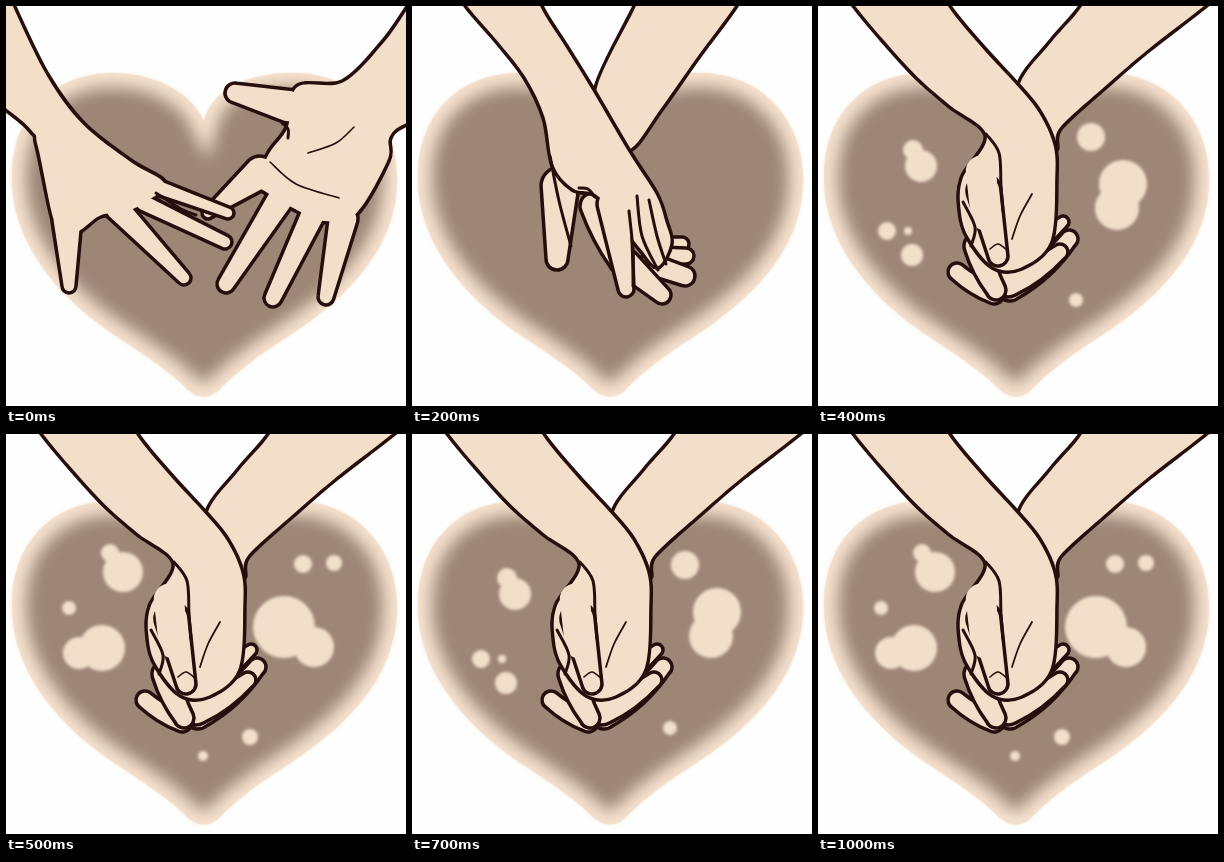
These frames come from a looping animation (400 px wide and 400 px high, 1100 ms). An HTML page:

```html
<!DOCTYPE html>
<html>
<head>
<meta charset="utf-8">
<style>
html, body { margin: 0; width: 100%; height: 100%; overflow: hidden; background: #fefefe; }
svg { display: block; width: 100vw; height: 100vh; }
.ink { fill: none; stroke: #260e0d; stroke-width: 7; stroke-linecap: round; stroke-linejoin: round; }
.skin { fill: #f3dfc9; }
</style>
</head>
<body>
<svg id="stage" viewBox="0 0 400 400">
  <defs>
    <path id="heart" d="M198 115C206 84 240 68 285 67C350 66 392 115 391 175C390 250 330 300 275 335C245 354 222 374 212 385Q197 397 181 383C165 366 140 350 110 330C50 290 6 235 6 172C6 105 50 67 108 67C150 68 184 86 198 115Z"/>
    <clipPath id="inside"><use href="#heart"/></clipPath>
    <filter id="fade" x="-20%" y="-20%" width="140%" height="140%"><feGaussianBlur stdDeviation="8"/></filter>
    <filter id="soft" x="-20%" y="-20%" width="140%" height="140%"><feGaussianBlur stdDeviation="1.7"/></filter>
  </defs>
  <use href="#heart" fill="#f6e2ce" filter="url(#soft)"/>
  <g clip-path="url(#inside)">
    <use href="#heart" fill="#9e8677" stroke="#f6e2ce" stroke-width="25" filter="url(#fade)"/>
  </g>
</svg>
<script>
const stage = document.getElementById('stage');
const inset = 1.75; // half the visible line

function add(parent, tag, attrs = {}) {
  const el = document.createElementNS('http://www.w3.org/2000/svg', tag);
  for (const k in attrs) el.setAttribute(k, attrs[k]);
  return parent.appendChild(el);
}
const group = (parent = stage) => add(parent, 'g');

function points(text) {
  const n = text.split(' ').map(Number);
  return n.filter((_, i) => i % 2 === 0).map((x, i) => [x, n[2 * i + 1]]);
}

// Smooth path; "at" decides what lies beyond the ends.
function smooth(p, count, at) {
  let d = 'M' + p[0];
  for (let i = 0; i < count; i++) {
    const [a, b, c, e] = [-1, 0, 1, 2].map(k => at(i + k));
    const h = b.map((v, j) => v + (c[j] - a[j]) / 6);
    const k = c.map((v, j) => v - (e[j] - b[j]) / 6);
    d += `C${h} ${k} ${c}`;
  }
  return d;
}

// Closed clockwise body, drawn in by half a line.
function body(text) {
  const p = points(text), n = p.length;
  const q = p.map(([x, y], i) => {
    const a = p[(i + n - 1) % n], b = p[(i + 1) % n];
    const tx = b[0] - a[0], ty = b[1] - a[1], len = Math.hypot(tx, ty);
    return [x - ty / len * inset, y + tx / len * inset];
  });
  return smooth(q, n, i => q[(i + n) % n]);
}

// Tapered, rounded finger from base to tip.
function finger(x0, y0, r0, x1, y1, r1, bend = 0) {
  const a = Math.atan2(y1 - y0, x1 - x0), nx = -Math.sin(a), ny = Math.cos(a);
  const s = r0 - inset, t = r1 - inset, m = (s + t) / 2;
  const at = (x, y, k) => [x + nx * k, y + ny * k];
  const mid = k => at((x0 + x1) / 2, (y0 + y1) / 2, bend + k);
  return `M${at(x0, y0, s)}Q${mid(m)} ${at(x1, y1, t)}A${t} ${t} 0 0 0 ${at(x1, y1, -t)}`
    + `Q${mid(-m)} ${at(x0, y0, -s)}A${s} ${s} 0 0 0 ${at(x0, y0, s)}Z`;
}

// Parts joined under one common outline.
function joinParts(g, ...parts) {
  for (const cls of ['ink', 'skin']) parts.forEach(d => add(g, 'path', { class: cls, d }));
}

function line(g, text, width = 3) {
  const p = points(text), last = p.length - 1;
  const d = smooth(p, last, i => p[Math.max(0, Math.min(last, i))]);
  add(g, 'path', { class: 'ink', d, style: `stroke-width:${width}` });
}

// Reaching hands
const reach = group(), right = group(reach), left = group(reach);
joinParts(right,
  body('440 85 388 127 383 155 352 208 322 217 293 207 260 188 250 176 262 146 280 121 290 80 336 75 375 37 400 2 430 -40'),
  finger(282, 100, 17, 229, 87, 10),
  finger(254, 167, 17, 202, 207, 6),
  finger(273, 195, 14, 220, 278, 9),
  finger(306, 210, 13, 267, 292, 9),
  finger(337, 213, 15, 320, 291, 8));
line(right, '276 117 282 123 282 132');
line(right, '348 121 330 137 302 147', 1.6);
line(right, '264 156 290 178 333 192', 1.6);
joinParts(left,
  body('-10 -40 10 3 43 70 78 117 125 154 160 177 140 198 120 207 95 211 76 225 60 232 46 214 30 140 21 122 -45 54'),
  finger(61, 215, 15, 63, 280, 7),
  finger(112, 203, 13, 178, 272, 7),
  finger(138, 197, 9, 219, 236, 7),
  finger(157, 183, 8, 222, 207, 6));
line(left, '150 187 175 203 190 209');

// Crossed hands
const cross = group();
joinParts(cross, body('240 -40 345 -40 325 0 286 53 250 104 218 145 190 130 183 82 222 0'));
joinParts(cross, finger(250, 240, 9, 270, 238, 7));
joinParts(cross, finger(250, 250, 9, 274, 250, 8));
joinParts(cross, finger(238, 258, 11, 273, 270, 10));
joinParts(cross, finger(215, 258, 14, 250, 289, 9));
joinParts(cross, finger(181, 200, 13, 208, 256, 11, 4));
joinParts(cross, finger(148, 180, 19, 145, 253, 11));
joinParts(cross,
  body('115 -40 130 0 155 40 181 82 218 145 245 187 255 215 260 238 246 262 228 245 205 215 183 190 160 184 140 160 131 112 112 72 84 36 53 0 30 -40'),
  finger(202, 198, 17, 214, 283, 8));
line(cross, '138 150 147 195 159 240');
line(cross, '167 182 176 183 183 191');
line(cross, '217 205 221 245 221 280');
line(cross, '225 190 230 230 246 264');
line(cross, '237 194 245 230 254 258');

// Joined hands
const joined = group();
const glow = [
  [[95, 144, 10], [103, 160, 16], [69, 225, 9], [90, 225, 4], [94, 249, 11], [273, 131, 14], [305, 178, 24], [299, 202, 22], [258, 294, 7]],
  [[104, 119, 9], [117, 138, 20], [63, 174, 7], [96, 214, 23], [73, 219, 16], [297, 130, 9], [328, 129, 8], [278, 193, 31], [308, 213, 20], [244, 303, 8], [197, 322, 5]]
].map(dots => {
  const g = add(joined, 'g', { filter: 'url(#soft)', fill: '#f2dfca' });
  for (const [cx, cy, r] of dots) add(g, 'circle', { cx, cy, r });
  return g;
});
joinParts(joined, body('430 -40 390 -1 332 44 290 80 243 123 236 145 205 120 200 78 232 35 262 0 285 -40'));
joinParts(joined, finger(228, 230, 9, 245, 216, 6));
joinParts(joined, finger(192, 282, 13, 251, 233, 9, 9));
joinParts(joined, finger(190, 276, 15, 242, 246, 8, 6));
joinParts(joined, finger(176, 288, 10, 139, 266, 9, -4));
joinParts(joined, finger(160, 240, 14, 178, 284, 10, 4));
joinParts(joined, body('110 -40 132 0 165 40 200 78 222 105 237 138 239 172 234 236 204 263 174 262 149 232 141 205 143 172 167 130 130 100 98 72 65 36 35 0 10 -40'));
joinParts(joined, finger(166, 185, 17, 180, 250, 10));
add(joined, 'path', { class: 'skin', d: finger(163, 165, 17, 167, 210, 16) });
line(joined, '168 128 181 147 183 180 185 205');
line(joined, '145 196 157 221 153 240');
line(joined, '172 243 180 238 189 244', 1.6);
line(joined, '214 188 202 210 194 233', 1.8);

const show = (el, on) => el.setAttribute('display', on ? 'inline' : 'none');
const move = (el, x, y) => el.setAttribute('transform', `translate(${x} ${y})`);

function draw() {
  const step = Math.floor(performance.now() % 1100 / 100);
  show(reach, step < 2);
  show(cross, step === 2);
  show(joined, step > 2);
  move(left, 24 * step, -6 * step);
  move(right, -17 * step, 6 * step);
  const turn = Math.floor((step - 3) / 2) & 1;
  glow.forEach((g, i) => show(g, i === turn));
  requestAnimationFrame(draw);
}
draw();
</script>
</body>
</html>
```
